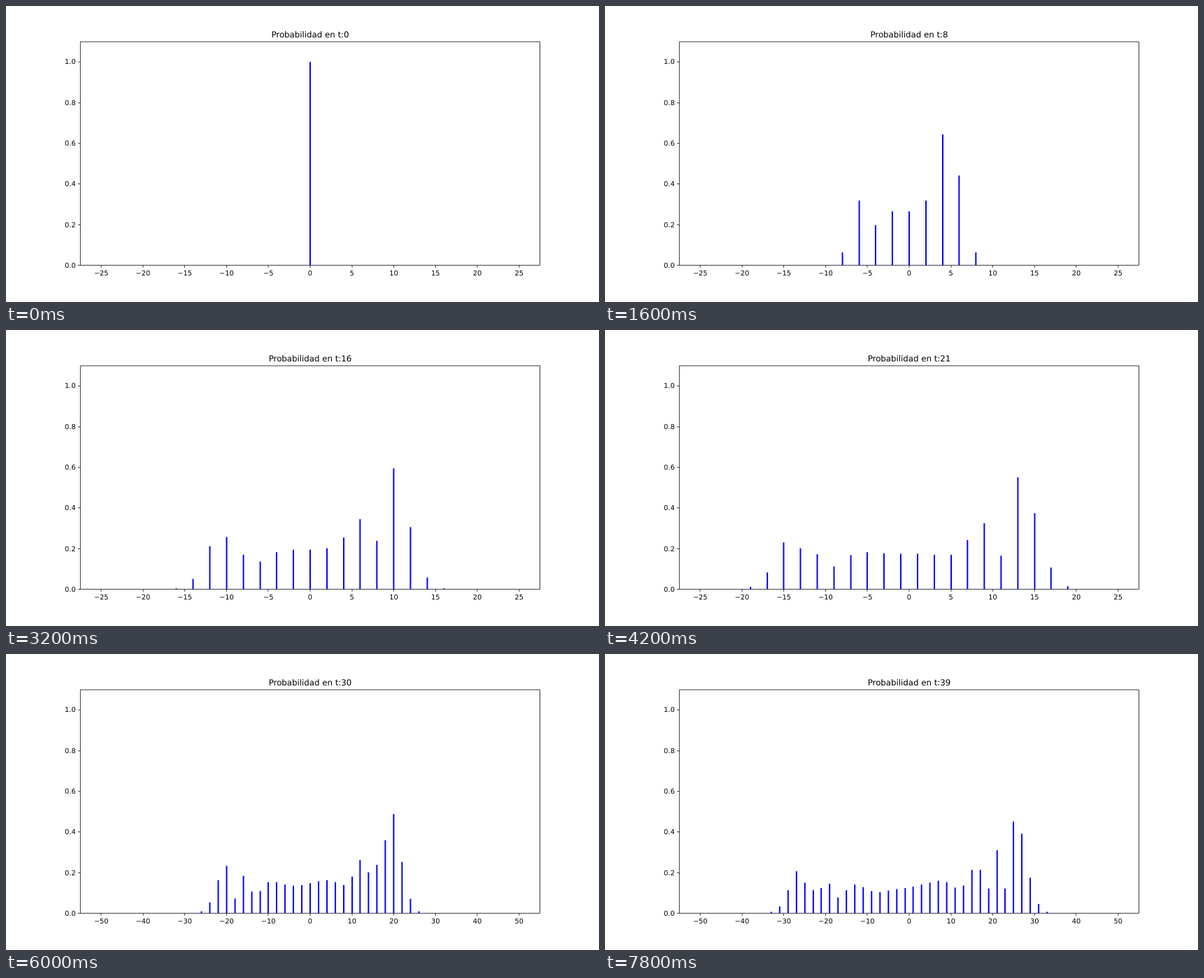
Recreate the animation shown at these times as an HTML page. Size 848x424 px, loop 8 s.

```html
<!DOCTYPE html>
<html lang="es">
<head>
<meta charset="utf-8">
<title>Probabilidad</title>
<style>
  html, body { margin: 0; width: 100%; height: 100%; overflow: hidden; background: #fff; }
  svg { display: block; width: 848px; height: 424px; }
  text { font: 13.89px "DejaVu Sans", sans-serif; text-rendering: geometricPrecision; text-anchor: middle; }
  #title { font-size: 16.67px; }
  #yLabels text { text-anchor: end; }
  #bars { stroke: #00f; stroke-width: 2.78; fill: none; }
  #axes { stroke: #000; stroke-width: 1.11; fill: none; }
</style>
</head>
<body>
<svg viewBox="0 0 1200 600">
  <path id="bars"/>
  <path id="axes"/>
  <g id="xLabels"></g>
  <g id="yLabels"></g>
  <text id="title" x="615.5" y="64"></text>
</svg>
<script>
const STEP_MS = 200, STEPS = 40, WIDEN_AT = 25;
// Plot area in the 1200 x 600 figure.
const LEFT = 150, RIGHT = 1080, TOP = 72, BOTTOM = 525;
const CENTER = (LEFT + RIGHT) / 2, UNIT = (BOTTOM - TOP) / 1.1;
const TICK = 4.86;
const $ = id => document.getElementById(id);
const snap = v => Math.round(v) + .5;

function addText(parent, x, y, label) {
  const node = document.createElementNS(parent.namespaceURI, 'text');
  node.setAttribute('x', x);
  node.setAttribute('y', y);
  node.textContent = label;
  parent.append(node);
  return node;
}

// Hadamard walk on a line: magnitude at each site for every step.
function walk(steps) {
  const size = 2 * steps + 1;
  let right = Array(size).fill(0), left = Array(size).fill(0);
  right[steps] = 1;
  const history = [];
  for (let t = 0; t < steps; t++) {
    history.push(right.map((r, i) => Math.hypot(r, left[i])));
    const nextRight = Array(size).fill(0), nextLeft = Array(size).fill(0);
    for (let i = 1; i < size - 1; i++) {
      nextRight[i + 1] = (right[i] + left[i]) * Math.SQRT1_2;
      nextLeft[i - 1] = (right[i] - left[i]) * Math.SQRT1_2;
    }
    right = nextRight;
    left = nextLeft;
  }
  return history;
}

const history = walk(STEPS);
let axes = `M${snap(LEFT)} ${snap(TOP)}H${snap(RIGHT)}V${snap(BOTTOM)}H${snap(LEFT)}Z`;
const xLabels = [];
for (let k = -5; k <= 5; k++) {
  const x = CENTER + k * (RIGHT - LEFT) / 11;
  axes += `M${snap(x)} ${snap(BOTTOM)}v${TICK}`;
  xLabels.push(addText($('xLabels'), x + .5, 546, ''));
}
for (let k = 0; k <= 5; k++) {
  const y = BOTTOM - k * UNIT / 5;
  axes += `M${snap(LEFT)} ${snap(y)}h${-TICK}`;
  addText($('yLabels'), 141, Math.round(y + 5), (k / 5).toFixed(1));
}
$('axes').setAttribute('d', axes);

function draw(t) {
  const range = t < WIDEN_AT ? 25 : 50;
  const scale = (RIGHT - LEFT) / (2.2 * range);
  const bars = history[t].map((height, i) => {
    const x = snap(CENTER + (i - STEPS) * scale);
    const top = snap(BOTTOM - height * UNIT);
    return top < BOTTOM ? `M${x} ${BOTTOM}V${top}` : '';
  });
  $('bars').setAttribute('d', bars.join(''));
  xLabels.forEach((node, i) => {
    node.textContent = String((i - 5) * range / 5).replace('-', '\u2212');
  });
  $('title').textContent = `Probabilidad en t:${t}`;
}

const start = performance.now();
let shown = -1;
function tick() {
  const t = Math.floor((performance.now() - start) / STEP_MS) % STEPS;
  if (t !== shown) draw(shown = t);
  requestAnimationFrame(tick);
}
tick();
</script>
</body>
</html>
```
